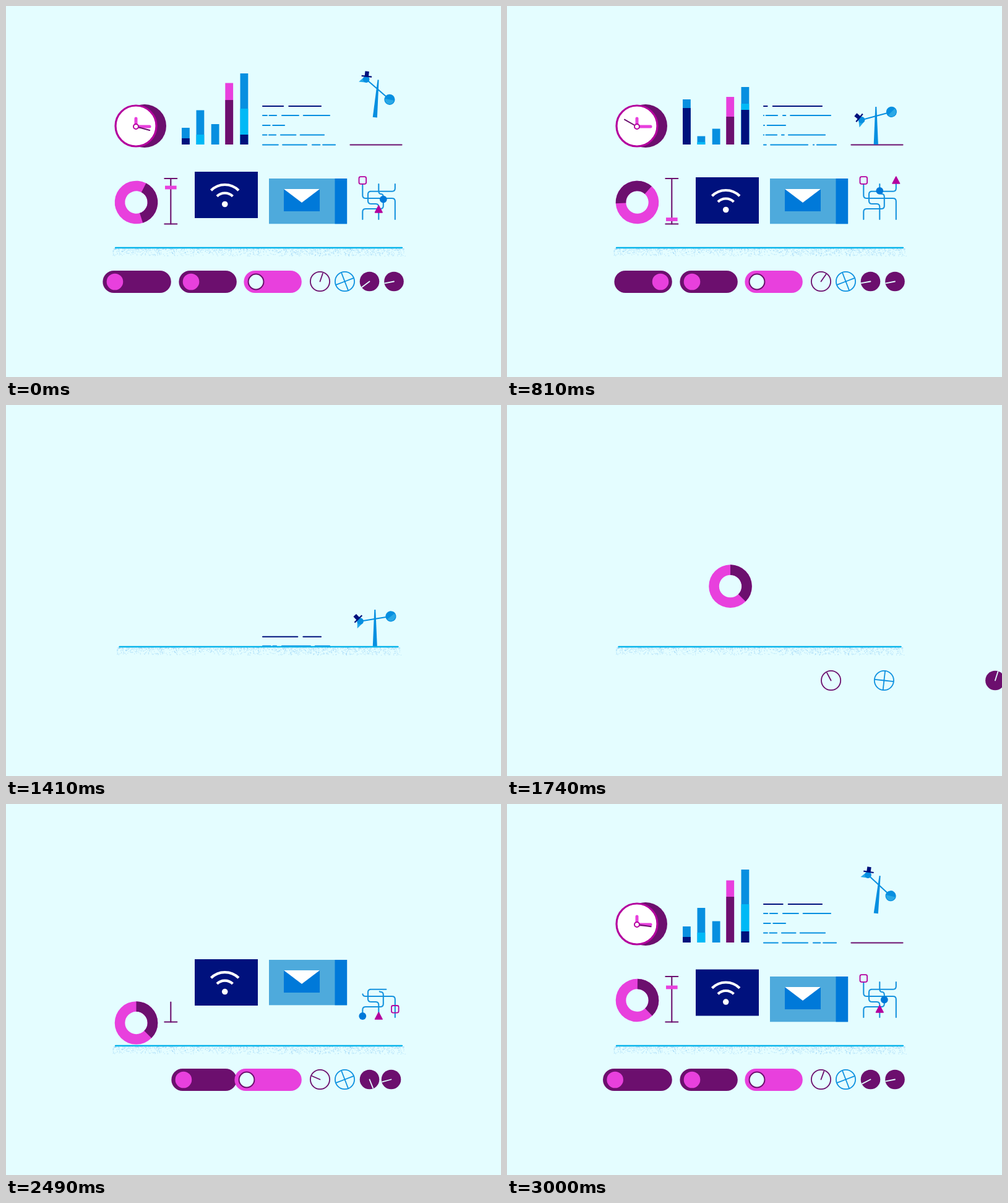
An HTML page with a canvas for the animation above (3030 ms loop, 800 px wide and 600 px high).

```html
<!DOCTYPE html>
<html lang="en">
<head>
<meta charset="utf-8">
<title>Interface kit</title>
<style>
html, body { margin: 0; width: 100%; height: 100%; overflow: hidden; background: #e4fdff; }
canvas { display: block; width: 800px; height: 600px; }
</style>
</head>
<body>
<canvas id="stage" width="800" height="600"></canvas>
<script>
const c = document.getElementById('stage').getContext('2d');
const LOOP = 3030, CUT = 1520, GROUND = 391;
const BG = '#e4fdff', NAVY = '#00117d', BLUE = '#078fe0', CYAN = '#00b9f6', ROYAL = '#0079d9',
  SKY = '#4eaadc', PURPLE = '#6c0f6e', PINK = '#e840dd', MAGENTA = '#b4009e';
const RAD = Math.PI / 180;
let T = 0;

const clamp = v => Math.max(0, Math.min(1, v));
const prog = (a, b) => clamp((T - a) / (b - a));
const out = p => 1 - (1 - p) ** 3;
const pop = p => 1 + 2.7 * (p - 1) ** 3 + 1.7 * (p - 1) ** 2;

// Smooth curve through time/value pairs, flat at every turning point
function key(...k) {
  const n = k.length / 2;
  if (T <= k[0]) return k[1];
  if (T >= k[2 * n - 2]) return k[2 * n - 1];
  let i = 0;
  while (T > k[2 * i + 2]) i++;
  const slope = j => (k[2 * j + 3] - k[2 * j + 1]) / (k[2 * j + 2] - k[2 * j]);
  const tangent = j => {
    if (j < 1 || j > n - 2) return 0;
    const a = slope(j - 1), b = slope(j);
    return a * b > 0 ? 2 * a * b / (a + b) : 0;
  };
  const h = k[2 * i + 2] - k[2 * i], u = (T - k[2 * i]) / h, v = u * u, w = v * u;
  return (2 * w - 3 * v + 1) * k[2 * i + 1] + (w - 2 * v + u) * h * tangent(i)
    + (3 * v - 2 * w) * k[2 * i + 3] + (w - v) * h * tangent(i + 1);
}

function group(x, y, draw, deg = 0, size = 1) {
  c.save();
  c.translate(x, y);
  c.rotate(deg * RAD);
  c.scale(size, size);
  draw();
  c.restore();
}
function clip(y, h, draw) {
  c.save();
  c.beginPath();
  c.rect(0, y, 800, h);
  c.clip();
  draw();
  c.restore();
}
function box(x, y, w, h, col) {
  c.fillStyle = col;
  c.fillRect(x, y, w, h);
}
function fill(col) { c.fillStyle = col; c.fill(); }
function stroke(col, w) { c.strokeStyle = col; c.lineWidth = w; c.stroke(); }
function poly(pts, col) {
  c.beginPath();
  pts.forEach(p => c.lineTo(p[0], p[1]));
  c.closePath();
  fill(col);
}
function line(x1, y1, x2, y2, col, w, cap = 'round') {
  c.lineCap = cap;
  c.beginPath();
  c.moveTo(x1, y1);
  c.lineTo(x2, y2);
  stroke(col, w);
}
function disc(x, y, r, col, edge, w) {
  c.beginPath();
  c.arc(x, y, r, 0, 7);
  if (col) fill(col);
  if (edge) stroke(edge, w);
}
function hand(deg, len, col, w) {
  line(0, 0, len * Math.cos(deg * RAD), len * Math.sin(deg * RAD), col, w);
}

function clock() {
  const size = pop(prog(2510, 2760));
  if (size <= 0) return;
  group(214, 194, () => {
    disc(10, 0, 35, PURPLE);
    disc(-4, 0, 33, '#fff', MAGENTA, 3.2);
    c.translate(-4, 1);
    hand(-90, 13, PINK, 5);
    hand(0, 22, PINK, 5);
    hand(15 + 0.24 * (T - LOOP), 23, PURPLE, 2);
    disc(0, 0, 4, '#fff', MAGENTA, 2);
  }, 0, size);
}

// Each layer gives its height at the four rest poses, tallest first
const bars = [
  [284, [BLUE, 26, 27, 73, 73], [NAVY, 9, 10, 59, 40]],
  [307.5, [BLUE, 56, 55.5, 13.5, 18.5], [CYAN, 16, 16, 4, 9]],
  [331.7, [BLUE, 34.5, 33, 25.5, 57]],
  [354.3, [PINK, 100.5, 99.5, 77, 77], [PURPLE, 74, 72, 45, 58]],
  [378.5, [BLUE, 118, 115, 93, 93], [CYAN, 62, 58, 66, 64], [NAVY, 18, 16, 56, 54]]
];
function chart() {
  bars.forEach(([x, ...layers], i) => layers.forEach(([col, a, b, d, e]) => {
    const s = 2500 + 12 * i;
    const h = key(s, 0, s + 340, a * 1.02, 3000, a, LOOP, b, 3840, d, 4140, e);
    box(x, 224 - h, 12.8, h, col);
  }));
}

const rows = [
  [162, 414, 510], [177, 414, 438, 445, 524], [193, 414, 451],
  [208.5, 414, 437, 443, 515], [224.5, 414, 487, 494, 533]
];
function text() {
  const phase = (0.365 + 0.00088 * (T - LOOP) + 4) % 1;
  rows.forEach(([y, ...words], i) => {
    const edge = 414 + 120 * out(prog(2530 + 25 * i, 2760 + 25 * i));
    const col = i ? BLUE : NAVY;
    const piece = (a, b) => {
      b = Math.min(b, edge);
      if (b - a > 1.5) line(a + 1, y, b - 1, y, col, 2.2);
    };
    for (let j = 0; j < words.length; j += 2) {
      const a = words[j], w = words[j + 1] - a;
      piece(a, a + phase * w);
      piece(a + (phase + 0.075) * w, a + w);
    }
  });
}

function bird() {
  const half = 41.5 * out(prog(2540, 2760));
  if (half > 0) line(598 - half, 224.5, 598 + half, 224.5, PURPLE, 2.2);
  if (T < 2540) return;
  const hop = T < 3200 ? Math.min(90, 7.4e-4 * (T - 2940) ** 2 - 50) : 0;
  const tilt = key(2700, 8, 3000, 6, LOOP, 5, 3200, 0);
  const arm = key(2600, 25, 2930, 45, 3000, 43, LOOP, 41, 3420, -26, 3840, -15, 4140, -9);
  clip(0, 224 , () => group(596.3, 224 + hop, () => {
    poly([[-1, -61], [1, -61], [3.6, 0], [-3.6, 0]], BLUE);
    group(0, -46, () => {
      line(-24, 0, 26, 0, BLUE, 2);
      disc(26, 0, 8.6, BLUE);
      c.beginPath();
      c.arc(26, 0, 7.4, -30 * RAD, 150 * RAD);
      fill('#2aa8e6');
      group(-24, 0, () => {
        poly([[-3, -4], [-11.5, 5], [1, 5]], '#25a9ea');
        disc(0, 0, 5.3, BLUE);
        box(-8, -6, 16.5, 2.2, NAVY);
        box(-3, -13, 6.4, 8, NAVY);
      }, -35);
    }, arm - tilt);
  }, tilt));
}

function donut() {
  const x = key(2140, 361, 2450, 210.5);
  const y = key(1550, 432, 1700, 289, 1740, 293, 1880, 354, 2540, 354, 2830, 314, 2960, 317.5);
  const roll = key(2140, 360, 2450, 0);
  const spin = T < 3000 ? 0 : 267 * out(prog(3000, 3880)) - 4 * prog(3840, 4140);
  group(x, y, () => {
    const ring = (a, b, col) => {
      c.beginPath();
      c.arc(0, 0, 34.8, a * RAD, b * RAD);
      c.arc(0, 0, 18.2, b * RAD, a * RAD, true);
      fill(col);
    };
    ring(0, 360, PINK);
    ring(-90, 45, PURPLE);
  }, roll + spin);
}

function slider() {
  const cap = 10 * out(prog(2330, 2440)), top = 352.5 - 73.5 * prog(2430, 2570);
  const lid = 10 * out(prog(2570, 2690));
  if (cap > 0) line(266.3 - cap, 352.5, 266.3 + cap, 352.5, PURPLE, 2.1);
  if (top < 352) line(266.3, 352.5, 266.3, top, PURPLE, 2.1);
  if (lid > 0) line(266.3 - lid, 279, 266.3 + lid, 279, PURPLE, 2.1);
  const w = 18.6 * out(prog(2620, 2760));
  const y = key(2650, 345, 3000, 296.5, LOOP, 293.5, 3160, 286, 3700, 347, 3840, 345, 4140, 341);
  box(266.3 - w / 2, y - 2.8, w, 5.8, PINK);
}

function wifi() {
  const y = key(2170, 394, 2450, 250, 2490, 251, 3000, 267.5, LOOP, 268, 3840, 277);
  group(305, y, () => {
    box(0, 0, 102, 75, NAVY);
    disc(48.7, 52.5, 4.8, '#fff');
    c.lineCap = 'butt';
    for (const r of [18, 31.5]) {
      c.beginPath();
      c.arc(48.7, 52.5, r, -135 * RAD, -45 * RAD);
      stroke('#fff', 4.2);
    }
  });
}

function mail() {
  group(425, key(1940, 394, 2130, 262, 2300, 248, 2490, 252, 2860, 279), () => {
    box(0, 0, 126, 73.3, SKY);
    box(106.5, 0, 19.7, 73.3, ROYAL);
    box(24, 17, 58, 36, ROYAL);
    poly([[24, 17], [82, 17], [53, 39]], '#fff');
  });
}

// Polyline with rounded corners, sampled with running length
function route(pts) {
  const path = [[...pts[0], 0]];
  const add = (x, y) => {
    const [a, b, d] = path[path.length - 1];
    path.push([x, y, d + Math.hypot(x - a, y - b)]);
  };
  const toward = (p, q, r) => {
    const d = Math.hypot(q[0] - p[0], q[1] - p[1]);
    return [0, 1].map(i => p[i] + (q[i] - p[i]) * Math.min(r / d, 0.5));
  };
  for (let i = 1; i < pts.length - 1; i++) {
    const p = pts[i], a = toward(p, pts[i - 1], 5), b = toward(p, pts[i + 1], 5);
    for (let u = 0; u <= 1.01; u += 0.2) {
      const mix = j => a[j] * (1 - u) ** 2 + 2 * p[j] * u * (1 - u) + b[j] * u * u;
      add(mix(0), mix(1));
    }
  }
  add(...pts[pts.length - 1]);
  return path;
}
function along(path, d) {
  const i = path.findIndex(p => p[2] >= d);
  if (i < 0) return path[path.length - 1];
  if (!i) return path[0];
  const a = path[i - 1], b = path[i], u = (d - a[2]) / (b[2] - a[2] || 1);
  return [a[0] + (b[0] - a[0]) * u, a[1] + (b[1] - a[1]) * u];
}
const routes = [
  [[628.8, 345], [628.8, 311], [576.3, 311], [576.3, 282]],
  [[576.3, 345], [576.3, 328], [609.8, 328], [609.8, 304], [602.3, 304], [602.3, 282]],
  [[602.3, 345], [602.3, 320], [585, 320], [585, 299.7], [628.8, 299.7], [628.8, 282]]
].map(route);

function map() {
  if (T < 2080) return;
  const grown = key(2080, 0, 2130, 13, 2490, 86, 2660, 130);
  const size = pop(prog(2310, 2460));
  group(0, key(2130, 46, 2400, 0), () => {
    c.lineCap = c.lineJoin = 'round';
    routes.forEach((path, i) => {
      const end = Math.min(grown - (i === 1 ? 11 : 0), path[path.length - 1][2] - 6);
      if (end <= 0) return;
      c.beginPath();
      path.filter(p => p[2] < end).forEach(p => c.lineTo(p[0], p[1]));
      c.lineTo(...along(path, end).slice(0, 2));
      stroke('#1693de', 2.1);
    });
    if (size <= 0) return;
    const token = (i, d, draw) => {
      const [x, y] = along(routes[i], d);
      group(x, y, draw, 0, size);
    };
    token(0, key(2400, 0, 2490, 13, 2860, 112), () => {
      c.beginPath();
      c.roundRect(-5.8, -5.8, 11.6, 11.6, 2.5);
      stroke(MAGENTA, 1.8);
    });
    token(1, key(2490, 2, 3000, 58, LOOP, 62, 3400, 96, 3840, 80, 4140, 60),
      () => disc(0, 0, 5.9, ROYAL));
    token(2, key(2490, 2, 3000, 13, LOOP, 16, 3400, 100, 3660, 118), () => {
      poly([[0, -6], [5.8, 5], [-5.8, 5]], MAGENTA);
      stroke(MAGENTA, 1.6);
    });
  });
}

function toggle(right, start, peak, end, over, light, flip = 0) {
  const w = key(start - 60, 0, start, 36, peak, 93.4 * over, end, 93.4);
  if (w < 1) return;
  const x = right - w, r = Math.min(18, w / 2);
  c.beginPath();
  c.roundRect(x, 428, w, 36, r);
  fill(light ? PINK : PURPLE);
  const k = Math.min(1, w / 36), kx = x + 19.6 * k + flip * (w - 38.4);
  if (light) disc(kx, 446, 12.4 * k, BG, PURPLE, 2);
  else disc(kx, 446, 13.3 * k, PINK);
}

function dials() {
  const y = 445.5;
  const items = [
    [885, key(1550, 830, 1740, 524, 1900, 488, 2130, 495.5, 2440, 507.5), () => {
      disc(0, 0, 15.6, null, PURPLE, 1.8);
      hand(key(1550, 700, 1740, 243, 1900, 160, 2130, 180, 2490, 203, 3000, 290, 3010, 290, 3200, 255, 3840, 305), 14, PURPLE, 1.8);
    }],
    [900, key(1590, 840, 1740, 610, 1960, 525, 2130, 534, 2470, 547.5), x => {
      disc(0, 0, 15.6, null, '#0f92e0', 1.8);
      for (let i = 0; i < 4; i++) hand(-21 + (x - 547.5) * 3.35 + 90 * i, 15, '#0f92e0', 1.8);
    }],
    [979, key(1640, 960, 1740, 790, 2030, 570, 2130, 573.5, 2470, 587.5), () => {
      disc(0, 0, 15.8, PURPLE);
      hand(key(1640, 1000, 1740, 650, 2050, 15, 2130, 22, 2490, 68, 2940, 156, 3000, 153, LOOP, 143, 3200, 110, 3840, 170, 4140, 121), 15, BG, 1.8);
    }],
    [1027, key(1770, 840, 2070, 616, 2130, 619, 2490, 622.5, 2800, 627), () => {
      disc(0, 0, 15.8, PURPLE);
      hand(key(1770, 720, 2070, 135, 2130, 145, 2490, 165, 2800, 169), 15, BG, 1.8);
    }]
  ];
  for (const [t, x, draw] of items) group(x, y - rise(t), () => draw(x));
}

const rise = t => 85 * prog(t + LOOP, t + LOOP + 220) ** 2;
const drop = (t, draw) => group(0, 290 * prog(t + LOOP, t + LOOP + 230) ** 2, draw);

let seed = 7;
const rnd = () => (seed = seed * 16807 % 2147483647) / 2147483647;
const grains = Array.from({ length: 1100 }, () => [rnd() * 472 - 236, 12 * rnd() ** 1.8]);

function ground() {
  const k = out(prog(1530, 1810)) * (1 - prog(4420, 4545) ** 2);
  if (k <= 0) return;
  const y = GROUND + key(3950, 0, 4060, -1.5, 4140, -1.2, 4260, 0.8, 4400, 0);
  c.fillStyle = 'rgba(80,170,235,.28)';
  for (const [x, d] of grains) c.fillRect(408.5 + x * k, y + 1 + d, 1.2, 1.2);
  line(408.5 - 231.5 * k, y, 408.5 + 231.5 * k, y, '#08b4ea', 2.4);
}

function draw(t) {
  T = t < CUT ? t + LOOP : t;
  box(0, 0, 800, 600, BG);
  clip(0, GROUND, () => {
    [donut, slider, wifi, mail, map].forEach((f, i) => drop(1125 + 18 * i, f));
    [clock, chart, text, bird].forEach((f, i) => drop(1170 + 22 * i, f));
  });
  clip(GROUND, 209, () => {
    const lift = (t, f) => group(0, -rise(t), f);
    lift(822, () => toggle(266.8, 2620, 2900, 3400, 1.22, false, key(3430, 0, 3700, 1)));
    lift(842, () => toggle(372.8, 2200, 2560, 2960, 1.17, false));
    lift(865, () => toggle(477.8, 1870, 2400, 2850, 1.18, true));
    dials();
  });
  ground();
}

const begin = performance.now();
function tick() {
  draw((performance.now() - begin) % LOOP);
  requestAnimationFrame(tick);
}
tick();
</script>
</body>
</html>
```
